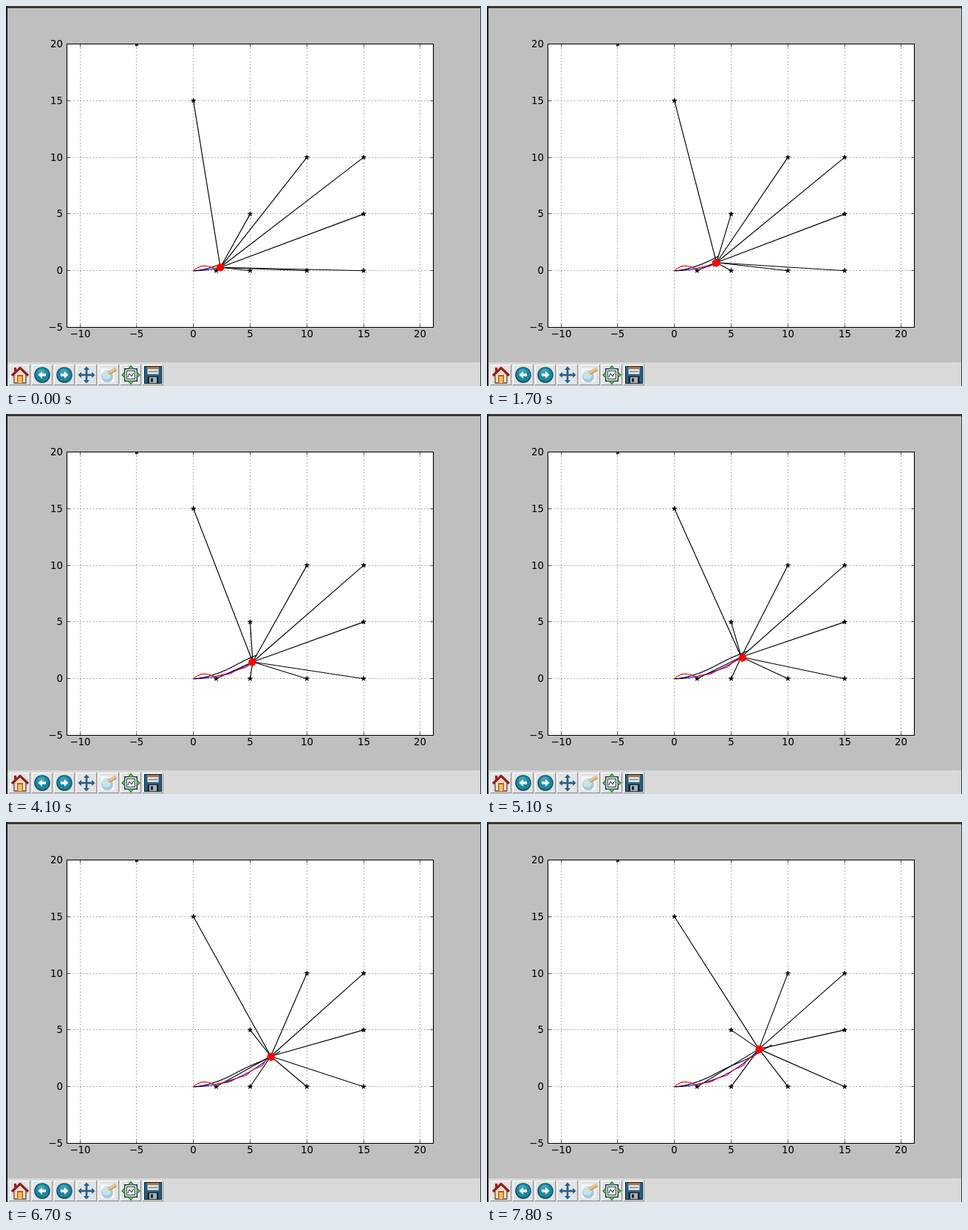
An HTML page with a canvas for the animation above (8 s loop, 643 px wide and 515 px high).

```html
<!DOCTYPE html>
<html>
<head>
<meta charset="utf-8">
<style>
html, body { margin: 0; width: 100%; height: 100%; overflow: hidden; background: #bfbfbf; }
canvas { display: block; }
</style>
</head>
<body>
<canvas id="stage" width="643" height="515"></canvas>
<script>
const c = document.getElementById('stage').getContext('2d');
const { sin, cos, exp, hypot, min, max, floor, PI } = Math;
const LOOP = 8000, DT = 0.1, UNIT = 15.36;
const BOX = [82.5, 51.5, 496, 384];
const plot = (x, y) => [253.7 + UNIT * x, 358.7 - UNIT * y];

const landmarks = [[2, 0], [5, 0], [10, 0], [15, 0], [5, 5], [15, 5], [10, 10], [15, 10], [0, 15]];
const outOfRange = [-5, 20];

// The robot drives an arc of radius 10 at unit speed
const truth = t => [10 * sin(t / 10), 10 - 10 * cos(t / 10)];

// Dead reckoning turns too early, then drifts off almost straight
function odometry(t) {
  const x = 1.02 * t;
  return [x, 0.53 * (hypot(x, 2) - 2) + 0.01 * x * cos(1.46 * (x - 4.5))];
}

// The estimate overshoots at first, then wobbles around the truth
function estimate(t) {
  const [x, y] = truth(t), settled = min(1, t / 2);
  return [
    x + settled * (0.03 + 0.08 * cos(3.7 * (t - 4.6))),
    y + 0.8 * t * exp(-0.75 * t * t) - settled * (0.05 + 0.03 * sin(4.2 * t))
  ];
}

// Steps come at a steady rate, with one short stall
function stepAt(ms) {
  const tick = floor(ms / 100), stall = max(0, min(2.5, tick - 23.5));
  return 24 + floor(0.79 * (tick - stall) + 0.93);
}

function rect(color, x, y, w, h) {
  c.fillStyle = color;
  c.fillRect(x, y, w, h);
}

function trace(points, close) {
  c.beginPath();
  points.forEach(p => c.lineTo(p[0], p[1]));
  if (close) c.closePath();
}

function line(color, width, points, close) {
  trace(points, close);
  c.strokeStyle = color;
  c.lineWidth = width;
  c.stroke();
}

function poly(color, points) {
  trace(points, true);
  c.fillStyle = color;
  c.fill();
}

function disc(color, x, y, r) {
  c.beginPath();
  c.arc(x, y, r, 0, 7);
  c.fillStyle = color;
  c.fill();
}

function star(x, y) {
  const points = Array.from({ length: 10 }, (_, i) => {
    const r = i % 2 ? 1.3 : 3.3, a = i * PI / 5;
    return [x + r * sin(a), y - r * cos(a)];
  });
  poly('#000', points);
  line('#000', 0.7, points, true);
}

// Runs draw four times, a quarter turn apart
function quarters(draw) {
  for (let i = 0; i < 4; i++) {
    draw();
    c.rotate(PI / 2);
  }
}

function arrow(dir) {
  disc('#0f566b', 0, 0, 10.8);
  disc('#1c87a0', 0, -0.3, 9.4);
  disc('#3aa3b8', -1, -3, 5.5);
  c.scale(dir, 1);
  poly('#fff', [[5.5, 0], [0, -5], [0, -1.7], [-5, -1.7], [-5, 1.7], [0, 1.7], [0, 5]]);
}

const icons = [
  () => {
    rect('#8c2424', -8, -10, 3, 7);
    poly('#f0dccb', [[-8, 11], [-8, 0], [0, -8], [8, 0], [8, 11]]);
    line('#6d4038', 1.3, [[-8, 0], [-8, 11], [8, 11], [8, 0]]);
    rect('#b5651d', -4, 0, 8, 11);
    rect('#f2c46c', -2.5, 2, 5, 9);
    line('#8f2020', 3.2, [[-11, 1], [0, -9.5], [11, 1]]);
  },
  () => arrow(-1),
  () => arrow(1),
  () => quarters(() => {
    rect('#235f86', -1.3, -8, 2.6, 8);
    poly('#235f86', [[0, -11.5], [4, -7], [-4, -7]]);
  }),
  () => {
    rect('#f4f8f9', -11, -9, 19, 19);
    disc('#9fcbd8', -2, 2, 8);
    disc('#c9e3ea', -3, 0, 6);
    line('#d3a265', 5, [[0, -2], [10, -8]]);
    line('#efd09a', 2, [[0, -3], [10, -9]]);
  },
  () => {
    rect('#17374f', -9, -9, 18, 18);
    rect('#fff', -7.5, -7.5, 15, 15);
    rect('#17374f', -6, -6, 12, 12);
    rect('#fff', -5, -5, 10, 10);
    line('#222', 1, [[-4, 3], [-2, -2], [1, 2], [4, -3]]);
    quarters(() => {
      poly('#1d6b18', [[0, -13], [4.5, -8], [-4.5, -8]]);
      poly('#5ed23c', [[0, -11.5], [2.7, -8.5], [-2.7, -8.5]]);
    });
  },
  () => {
    rect('#0e2a3d', -12, -12, 24, 24);
    rect('#285f80', -11, -11, 22, 22);
    rect('#d9dde0', -7.5, -11, 15, 10);
    rect('#b5713c', -7.5, -11, 15, 3);
    rect('#777', -6, -5, 12, 1);
    rect('#15252f', -7.5, 2, 15, 9);
    rect('#a9b0b4', -5, 3, 10, 8);
    rect('#15252f', -3, 4.5, 3, 5);
  }
];

function drawWindow() {
  rect('#bfbfbf', 0, 0, 643, 515);
  rect('#d9d9d9', 0, 483, 643, 32);
  icons.forEach((icon, i) => {
    const x = 5 + 30 * i;
    rect('#8e8e8e', x, 486, 28, 28);
    rect('#fff', x, 486, 27, 27);
    rect('#e3e3e3', x + 1, 487, 26, 26);
    c.save();
    c.translate(x + 14, 500);
    icon();
    c.restore();
  });
  rect('#3b3836', 0, 0, 643, 3);
  rect('#1c1a1b', 0, 0, 2, 515);
  rect('#3b3836', 642, 0, 1, 515);
}

// One dotted grid line with a tick at each end
function grid(a, z) {
  c.setLineDash([1.1, 3.34]);
  line('#333', 0.7, [a, z]);
  c.setLineDash([]);
  const k = 4.4 / hypot(z[0] - a[0], z[1] - a[1]);
  const dx = (z[0] - a[0]) * k, dy = (z[1] - a[1]) * k;
  line('#000', 0.6, [a, [a[0] + dx, a[1] + dy]]);
  line('#000', 0.6, [z, [z[0] - dx, z[1] - dy]]);
}

function label(v, x, y, align) {
  c.textAlign = align;
  c.fillStyle = '#000';
  c.fillText(String(v).replace('-', '\u2212'), x, y);
}

function drawAxes() {
  const [l, t, w, h] = BOX, r = l + w, b = t + h;
  rect('#fff', ...BOX);
  c.font = '13.33px "DejaVu Sans", sans-serif';
  for (let v = -10; v <= 20; v += 5) {
    const [x, y] = plot(v, v).map(p => floor(p) + 0.5);
    grid([x, b], [x, t]);
    label(v, x, 449, 'center');
    if (v < -5) continue;
    grid([l, y], [r, y]);
    label(v, 77, y + 4.5, 'right');
  }
}

function history(color, path, n) {
  line(color, 1.15, Array.from({ length: n + 1 }, (_, i) => plot(...path(i * DT))));
}

function drawParticles(n) {
  const [x, y] = plot(...estimate(n * DT));
  let seed = n * 7919 + 17;
  const rand = () => (seed = seed * 16807 % 2147483647) / 2147483647;
  disc('#f00', x, y, 5.1);
  for (let i = 0; i < 8; i++) {
    const a = rand() * 2 * PI, r = 3 + rand();
    disc('#f00', x + r * cos(a), y + r * sin(a), 1.8);
  }
}

function drawPlot(n) {
  const here = plot(...truth(n * DT));
  c.save();
  c.beginPath();
  c.rect(...BOX);
  c.clip();
  landmarks.forEach(p => line('#000', 1.15, [here, plot(...p)]));
  [...landmarks, outOfRange].forEach(p => star(...plot(...p)));
  history('#00f', truth, n);
  history('#000', odometry, n);
  history('#f00', estimate, n);
  drawParticles(n);
  c.restore();
  c.strokeStyle = '#000';
  c.lineWidth = 1.1;
  c.strokeRect(...BOX);
}

c.lineJoin = 'round';
const t0 = performance.now();
function frame() {
  drawWindow();
  drawAxes();
  drawPlot(stepAt((performance.now() - t0) % LOOP));
  requestAnimationFrame(frame);
}
frame();
</script>
</body>
</html>
```
